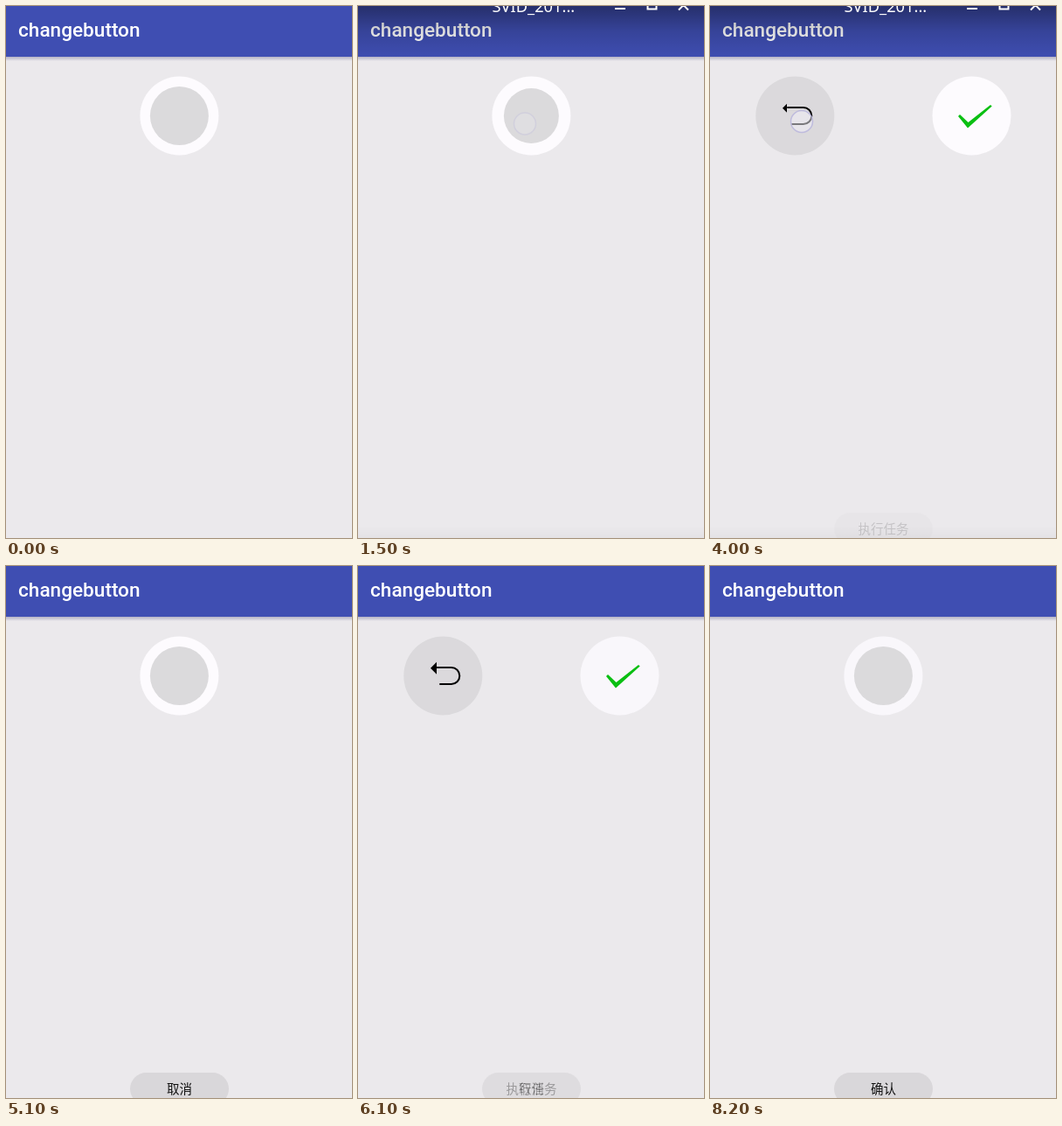
Recreate the animation shown at these times as an HTML page. Size 396x608 px, loop 8.6 s.

```html
<!DOCTYPE html>
<html lang="zh">
<head>
<meta charset="utf-8">
<title>changebutton</title>
<style>
  html, body { margin: 0; width: 100%; height: 100%; overflow: hidden; background: #ebe9ec; }
  svg { display: block; width: 396px; height: 608px; }
  .title { font: 500 22.6px Roboto, sans-serif; fill: #fff; }
  .file { font: 18.3px "Noto Sans", sans-serif; fill: #fff; }
  .toast { font: 14.5px "Noto Sans CJK SC", "Noto Sans CJK", sans-serif; fill: #111; text-anchor: middle; }
</style>
</head>
<body>
<svg viewBox="0 0 396 608">
  <defs>
    <linearGradient id="shadow" x2="0" y2="1">
      <stop offset="0" stop-color="#b4b2c6"/>
      <stop offset="1" stop-color="#ebe9ec"/>
    </linearGradient>
    <linearGradient id="shade" x2="0" y2="1">
      <stop offset="0" stop-opacity=".4"/>
      <stop offset=".5" stop-opacity=".14"/>
      <stop offset="1" stop-opacity=".01"/>
    </linearGradient>
    <linearGradient id="foot" x2="0" y2="1">
      <stop offset="0" stop-opacity="0"/>
      <stop offset="1" stop-opacity=".03"/>
    </linearGradient>
  </defs>

  <rect width="396" height="608" fill="#ebe9ec"/>
  <rect y="58" width="396" height="5" fill="url(#shadow)"/>
  <rect width="396" height="58" fill="#3f4eb2"/>
  <text class="title" x="14" y="35">changebutton</text>

  <g id="record" transform="translate(198.4 125.5)">
    <circle class="white" r="45"/>
    <circle id="inner" fill="#dbdadc"/>
  </g>

  <g id="confirm">
    <circle class="white" r="45"/>
    <path d="M-15.5 .5L-13.5 -1.5L-4 7.5L21.5 -12.5L23.2 -11L-4.5 14Z" fill="#0abf12"/>
  </g>
  <g id="cancel">
    <circle r="45" fill="#dad9db" fill-opacity=".93"/>
    <path d="M-9 -9.5H9.5A9.5 9.5 0 0 1 9.5 9.5H-4" fill="none" stroke="#000" stroke-width="2"/>
    <path id="head"/>
  </g>

  <circle id="touch" r="12.5" fill="#f4f2fa" fill-opacity=".5" stroke="#b9b5dc" stroke-width="1.5" stroke-opacity=".85"/>
  <g id="toasts"></g>

  <g id="chrome">
    <rect width="396" height="58" fill="url(#shade)"/>
    <rect y="594" width="396" height="14" fill="url(#foot)"/>
    <text class="file" x="153.5" y="7">SVID_201...</text>
    <path d="M294 3H306M331.5 -6V3.5H341.5V-6M367 4.5L378 -6.5M378 4.5L367 -6.5" fill="none" stroke="#fff" stroke-width="2"/>
  </g>
</svg>

<script>
const LOOP = 8600, STEP = 100;
const MID = 198.4, SPREAD = 101.1, TOP = 125.5;

// press start, split start, collapse
const rounds = [
  { press: 1300, split: 1750, end: 4100, head: 5 },
  { press: 5200, split: 5650, end: 7400, head: 7 }
];

// from, to, x, y, opacity
const touches = [
  [1300, 1700, 191, 134.5, .35],
  [3800, 4100, 105, 132, 1],
  [5200, 5600, 193, 132, .35],
  [7300, 7600, 304.5, 117.5, 1]
];

// text, fade in from / to, fade out from / to
const toasts = [
  ["执行任务", 1800, 2200, 3500, 4100],
  ["取消", 4000, 4400, 6000, 6200],
  ["执行任务", 6000, 6300, 7600, 7900],
  ["确认", 7800, 8200, 8600, 8700]
];

const $ = id => document.getElementById(id);
const ramp = (t, a, b) => Math.min(1, Math.max(0, (t - a) / (b - a)));
const ease = p => (1 - Math.cos(Math.PI * p)) / 2;
const show = (el, on) => el.setAttribute("visibility", on ? "visible" : "hidden");
const place = (el, x, y) => el.setAttribute("transform", `translate(${x} ${y})`);

$("toasts").innerHTML = toasts.map(([text]) =>
  `<g><rect x="142" y="579" width="113" height="37" rx="18.5" fill="#d9d7da"/>
   <text class="toast" x="198.5" y="602.5">${text}</text></g>`).join("");
const toastEls = [...$("toasts").children];
const whites = document.querySelectorAll(".white");

function draw(t) {
  const open = rounds.find(r => t >= r.split && t < r.end);
  show($("record"), !open);
  show($("cancel"), open);
  show($("confirm"), open);
  if (open) {
    const dx = SPREAD * ease(ramp(t, open.split, open.split + 200));
    place($("cancel"), MID - dx, TOP);
    place($("confirm"), MID + dx, TOP);
    const w = open.head;
    $("head").setAttribute("d", `M${w - 14.3 - w} -8.7l${w} ${-w}v${2 * w}z`);
  }

  const press = rounds.find(r => t >= r.press && t < r.split);
  $("inner").setAttribute("r", 33.5 - (press ? (t - press.press) / 100 : 0));
  whites.forEach(el => el.setAttribute("fill", t < 5600 ? "#fdfbfe" : "#f9f7fb"));

  const touch = touches.find(([a, b]) => t >= a && t < b);
  show($("touch"), touch);
  if (touch) {
    place($("touch"), touch[2], touch[3]);
    $("touch").setAttribute("opacity", touch[4]);
  }

  toasts.forEach(([, a, b, c, d], i) =>
    toastEls[i].setAttribute("opacity", ramp(t, a, b) * (1 - ramp(t, c, d))));
  show($("chrome"), t >= 200 && t < 5100);
}

const start = performance.now();
function tick() {
  const t = (performance.now() - start) % LOOP;
  draw(Math.floor(t / STEP) * STEP);
  requestAnimationFrame(tick);
}
tick();
</script>
</body>
</html>
```
